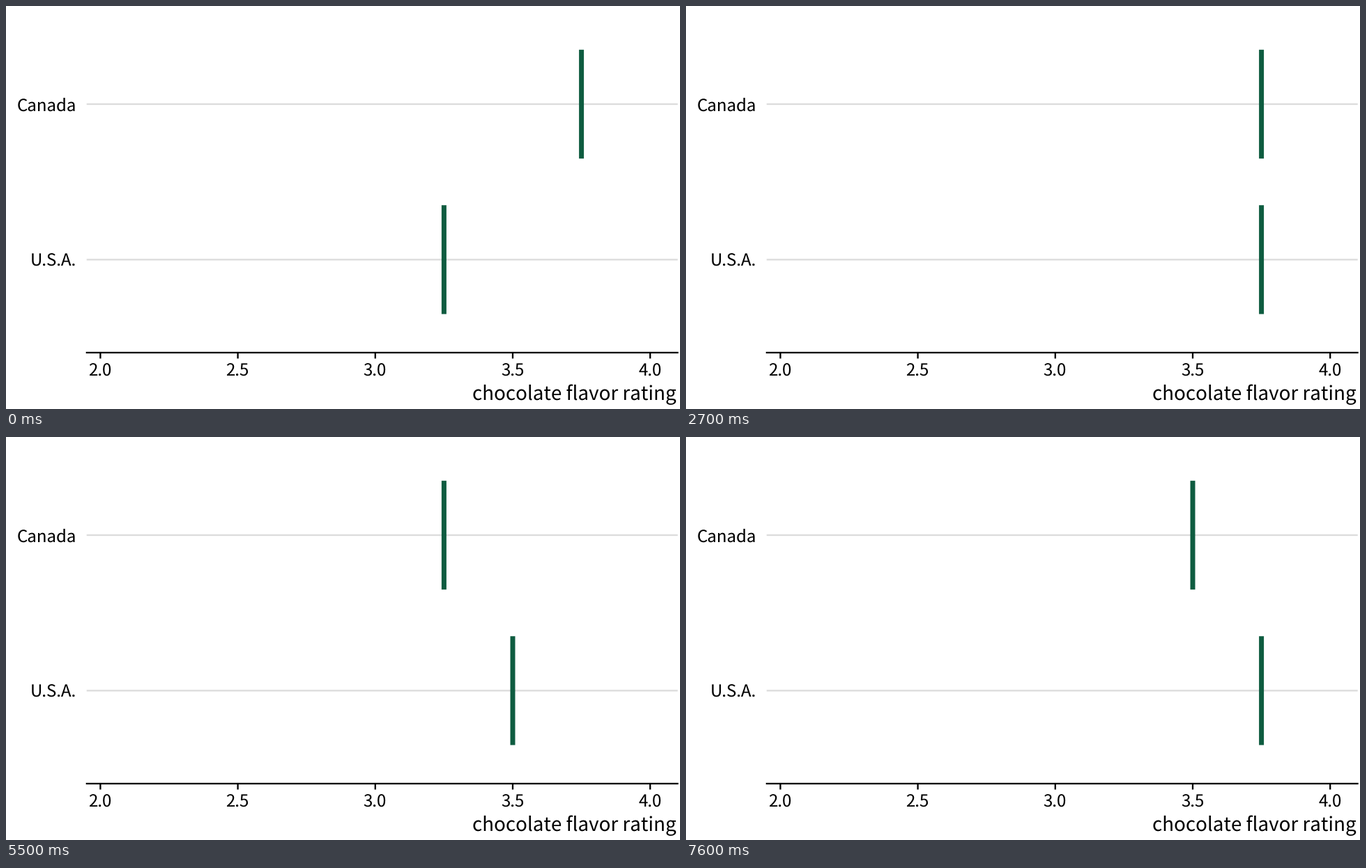
Recreate the animation shown at these times as a matplotlib script. Size 967 by 579 pixels, loop 8 s.

```python
import matplotlib.pyplot as plt
from matplotlib.animation import FuncAnimation
from matplotlib.patches import Rectangle

W, H, DPI = 967, 579, 64
STEP_MS, LOOP_MS = 100, 8000
BEAT_MS, LEAD_MS = 700, 100  # one draw per beat, the first already under way
GREEN, GRID, INK = "#0e5c40", "#dcdcdc", "#000000"
ROW_TOP, ROW_GAP = 141, 223.4
BAR_W, BAR_H = 7, 0.7 * ROW_GAP
LINE_W = 2.3

# Rating shown on each beat
DRAWS = {
    "Canada": [3.75, 3, 3.5, 2.5, 3.75, 3.25, 3.25, 3.75, 3.25, 2.75, 3.25, 3.5],
    "U.S.A.": [3.25, 4, 3, 2.5, 3.75, 3.25, 3, 3.75, 3.5, 2.75, 4, 3.75],
}

plt.rcParams["font.family"] = "Noto Sans CJK JP"
plt.rcParams["text.hinting"] = "none"
plt.rcParams["text.hinting_factor"] = 1

fig = plt.figure(figsize=(W / DPI, H / DPI), dpi=DPI, facecolor="white")
ax = fig.add_axes([0, 0, 1, 1])
ax.set_xlim(0, W)
ax.set_ylim(H, 0)
ax.axis("off")


def rating_x(rating):
    return 135.4 + (rating - 2) * 394.4


def box(cx, cy, w, h, color, z):
    patch = Rectangle((cx - w / 2, cy - h / 2), w, h, facecolor=color,
                      linewidth=0, zorder=z, snap=False)
    return ax.add_patch(patch)


def label(x, baseline, text, px, ha):
    ax.text(x, baseline, text, fontsize=px * 72 / DPI, color=INK,
            ha=ha, va="baseline")


bars = {}
for row, name in enumerate(DRAWS):
    y = ROW_TOP + row * ROW_GAP
    box(539.7, y, 848, LINE_W, GRID, 1)
    label(101, y + 9.6, name, 24, "right")
    bars[name] = box(0, y, BAR_W, BAR_H, GREEN, 3)

box(539.7, 498, 850, LINE_W, INK, 2)
for half in range(4, 9):
    x = rating_x(half / 2)
    box(x, 502.5, LINE_W, 8, INK, 2)
    label(x - 0.4, 532, f"{half / 2:.1f}", 24, "center")
label(962, 566, "chocolate flavor rating", 27.8, "right")


def update(frame):
    beat = (frame * STEP_MS + LEAD_MS) // BEAT_MS
    for name, bar in bars.items():
        bar.set_x(rating_x(DRAWS[name][beat]) - BAR_W / 2)
    return list(bars.values())


anim = FuncAnimation(fig, update, frames=LOOP_MS // STEP_MS, interval=STEP_MS,
                     repeat=True, repeat_delay=0, blit=False)
plt.show()
```
